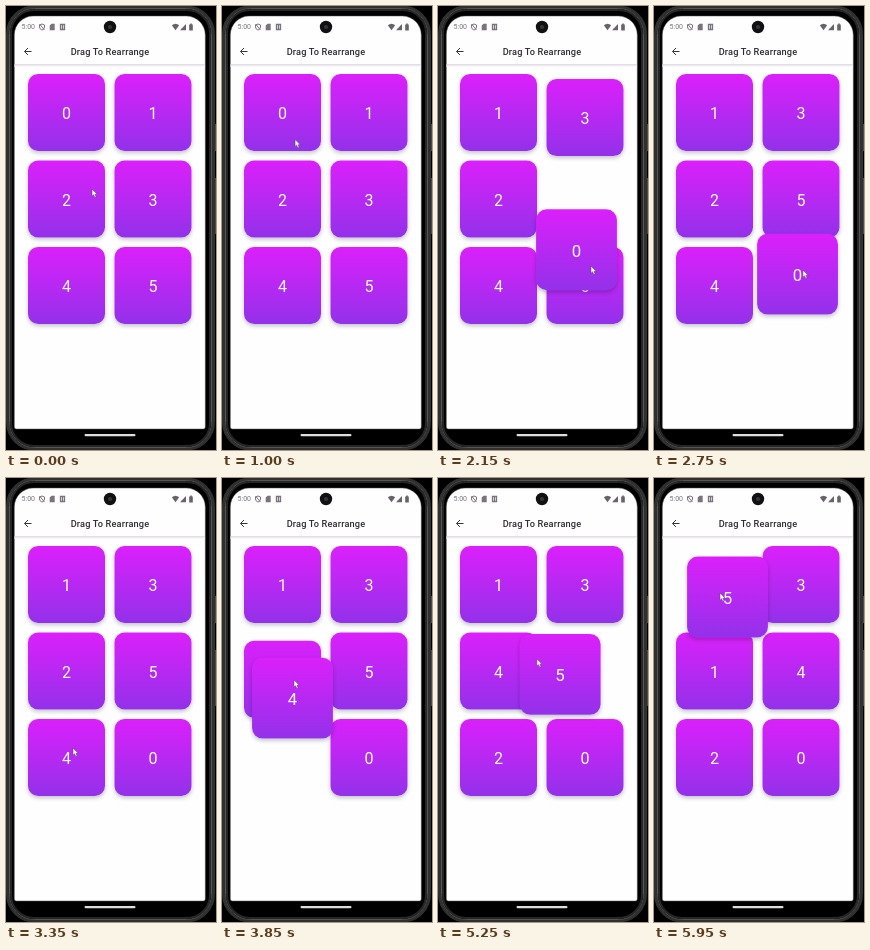
These frames come from a looping animation (210 by 444 pixels, 6000 ms). An HTML page:

```html
<!DOCTYPE html>
<html lang="en">
<head>
<meta charset="utf-8">
<title>Drag To Rearrange</title>
<style>
html, body { margin: 0; width: 100%; height: 100%; overflow: hidden; background: #000; }
body { position: relative; font-family: Roboto, "Open Sans", sans-serif; }
svg, .tile, .text { position: absolute; }
#phone { left: 0; top: 0; }
.text { white-space: nowrap; line-height: 12px; }
#clock { left: 15.5px; top: 15px; font-size: 7px; color: #77747b; }
#title { left: 0; width: 208px; top: 40.3px; text-align: center; font-size: 9.2px; font-weight: 500; letter-spacing: .18px; color: #2f2d33; }

.tile, #cursor { animation: 6s linear infinite; }
.tile {
  left: 22.2px; top: 68px; width: 76.8px; height: 76.8px;
  border-radius: 10px;
  background: linear-gradient(#db20fb, #9331ea);
  box-shadow: 0 2px 4px rgba(0, 0, 0, .24);
  color: #fff; font-size: 16px; line-height: 79.6px; text-align: center;
}
#t0 { animation-name: t0; }
#t1 { animation-name: t1; animation-timing-function: ease-in-out; }
#t2 { animation-name: t2; animation-timing-function: ease-in-out; }
#t3 { animation-name: t3; animation-timing-function: ease-in-out; }
#t4 { animation-name: t4; }
#t5 { animation-name: t5; }
#cursor { left: 0; top: 0; z-index: 20; animation-name: cursor; }

/* Dragged across the top row, then down the right column */
@keyframes t0 {
  0%, 20% { translate: 0 0; scale: 1; z-index: 1; }
  22.5% { translate: 1px 0; scale: 1.05; z-index: 9; }
  24.17% { translate: 20px 0; }
  25.83% { translate: 54px 0; }
  27.5% { translate: 77px 1.5px; }
  29.17% { translate: 82px 22px; }
  31.67% { translate: 81px 68px; }
  33.33% { translate: 79px 105px; }
  35.83% { translate: 78px 137.2px; }
  40% { translate: 77px 144px; }
  44.17% { translate: 79px 146px; }
  45.83% { translate: 83px 161.5px; }
  48.33% { translate: 86.5px 173px; scale: 1.05; z-index: 9; }
  49.2%, 100% { translate: 86.5px 173px; scale: 1; z-index: 1; }
}
@keyframes t1 {
  0%, 24.4% { translate: 86.5px 0; }
  29.4%, 92.83% { translate: 0 0; }
  97.83%, 100% { translate: 0 86.5px; }
}
@keyframes t2 {
  0%, 63.1% { translate: 0 86.5px; }
  68.1%, 100% { translate: 0 173px; }
}
@keyframes t3 {
  0%, 31.7% { translate: 86.5px 86.5px; }
  36.7%, 100% { translate: 86.5px 0; }
}
/* Dragged up one row, later pushed right */
@keyframes t4 {
  0%, 58.33% { translate: 0 173px; scale: 1; z-index: 1; }
  60% { translate: 0 171px; scale: 1.05; z-index: 9; }
  61.67% { translate: 4px 155px; }
  64.17% { translate: 10px 113.7px; }
  65.83% { translate: 7px 97px; }
  68.33% { translate: 1px 88px; }
  70%, 72.5% { translate: 0 86.5px; scale: 1.05; z-index: 9; }
  75% { translate: 0 86.5px; scale: 1; z-index: 1; }
  90% { translate: 0 86.5px; animation-timing-function: ease-in-out; }
  95%, 100% { translate: 86.5px 86.5px; scale: 1; z-index: 1; }
}
/* Pushed up, then dragged left and up */
@keyframes t5 {
  0% { translate: 86.5px 173px; scale: 1; z-index: 1; }
  37.5% { translate: 86.5px 173px; animation-timing-function: ease-in-out; }
  42.5% { translate: 86.5px 86.5px; }
  83.83% { translate: 86.5px 86.5px; scale: 1; z-index: 1; }
  85.5% { translate: 83px 89px; scale: 1.05; z-index: 9; }
  87.5% { translate: 62px 90px; }
  89.17% { translate: 30px 84px; }
  90.83% { translate: 15px 70px; }
  93.33% { translate: 12px 35px; }
  95.83% { translate: 12px 18px; }
  99.17%, 100% { translate: 13px 12.5px; scale: 1.05; z-index: 9; }
}
@keyframes cursor {
  0% { translate: 86px 183px; }
  11.67% { translate: 86px 185px; }
  17.5% { translate: 71px 125px; }
  20% { translate: 71px 120px; }
  22.5% { translate: 72px 121px; }
  24.17% { translate: 96px 124px; }
  25.83% { translate: 128px 129px; }
  27.5% { translate: 148px 137px; }
  29.17% { translate: 153px 162px; }
  31.67% { translate: 154px 206px; }
  33.33% { translate: 154px 236px; }
  35.83% { translate: 153px 260px; }
  40% { translate: 150px 263px; }
  45.83% { translate: 149px 264px; }
  50% { translate: 120px 268px; }
  54.17%, 58.33% { translate: 67px 270px; }
  60% { translate: 68px 264px; }
  61.67% { translate: 71px 240px; }
  64.17% { translate: 72px 202px; }
  65.83% { translate: 70px 190px; }
  68.33% { translate: 66px 178px; }
  70%, 73.33% { translate: 65px 176px; }
  80.83%, 83.83% { translate: 139px 186px; }
  85.5% { translate: 132px 186px; }
  87.5% { translate: 99px 181px; }
  89.17% { translate: 82px 165px; }
  90.83% { translate: 74px 145px; }
  93.33% { translate: 68px 124px; }
  95.83% { translate: 66px 117px; }
  99.17%, 100% { translate: 66px 115px; }
}
</style>
</head>
<body>
<svg id="phone" width="210" height="444" viewBox="0 0 210 444">
  <defs>
    <linearGradient id="barShade" x2="0" y2="1">
      <stop stop-color="#dcd9de"/>
      <stop offset="1" stop-color="#fefdff"/>
    </linearGradient>
  </defs>
  <path d="M207 118h3v27h-3zM207 172h3v56h-3z" fill="#4a4a4a"/>
  <rect x="1.5" y="1" width="206" height="442" rx="27" fill="#000" stroke="#303030" stroke-width="3"/>
  <rect x="3.5" y="2.500" width="202" height="439" rx="25" fill="#000" stroke="#555"/>
  <rect x="5" y="4" width="199" height="436" rx="23" fill="#000" stroke="#262626" stroke-width="2"/>
  <path d="M8.300 421V29a19 19 0 0 1 19-19h153a19 19 0 0 1 19 19v392a2 2 0 0 1-2 2h-187a2 2 0 0 1-2-2z" fill="#fefdff" stroke="#555" stroke-width=".5"/>
  <rect x="8.5" y="58" width="190.500" height="3" fill="url(#barShade)"/>
  <circle cx="104" cy="21" r="6.200" fill="#111"/>
  <circle cx="104" cy="21" r="2" fill="#33363b"/>
  <rect x="78.500" y="427.900" width="51" height="2.400" rx="1.200" fill="#ddd"/>
  <g fill="none" stroke="#77747b">
    <path d="M36 18l2.500 1v2q0 2-2.500 3.200q-2.500-1.200-2.500-3.200v-2zM33.500 18l5 6"/>
    <path d="M54.500 18.500h4v5h-4zM56.500 19v4" stroke-width="1.300"/>
  </g>
  <path d="M45.500 17.700h3.200v6.600h-5v-4.800z" fill="#77747b"/>
  <g fill="#66636b">
    <path d="M165.800 19.300q3.700-3 7.400 0l-3.700 4.900z"/>
    <path d="M180 18v6.200h-6z"/>
    <path d="M183.200 18.500h1v-.9h1.600v.9h1v5.900h-3.600z"/>
  </g>
  <path d="M25.500 45.500h-7M22 42l-3.500 3.500L22 49" fill="none" stroke="#3a383e"/>
</svg>
<div id="clock" class="text">5:00</div>
<div id="title" class="text">Drag To Rearrange</div>

<div id="t0" class="tile">0</div>
<div id="t1" class="tile">1</div>
<div id="t2" class="tile">2</div>
<div id="t3" class="tile">3</div>
<div id="t4" class="tile">4</div>
<div id="t5" class="tile">5</div>

<svg id="cursor" width="8" height="11" viewBox="0 0 8 11" overflow="visible">
  <path d="M0 0v7.200l1.600-1.500 1.200 2.700 1.300-.6-1.200-2.600h2.200z" fill="#fff" stroke="#444" stroke-width=".5"/>
</svg>
</body>
</html>
```
